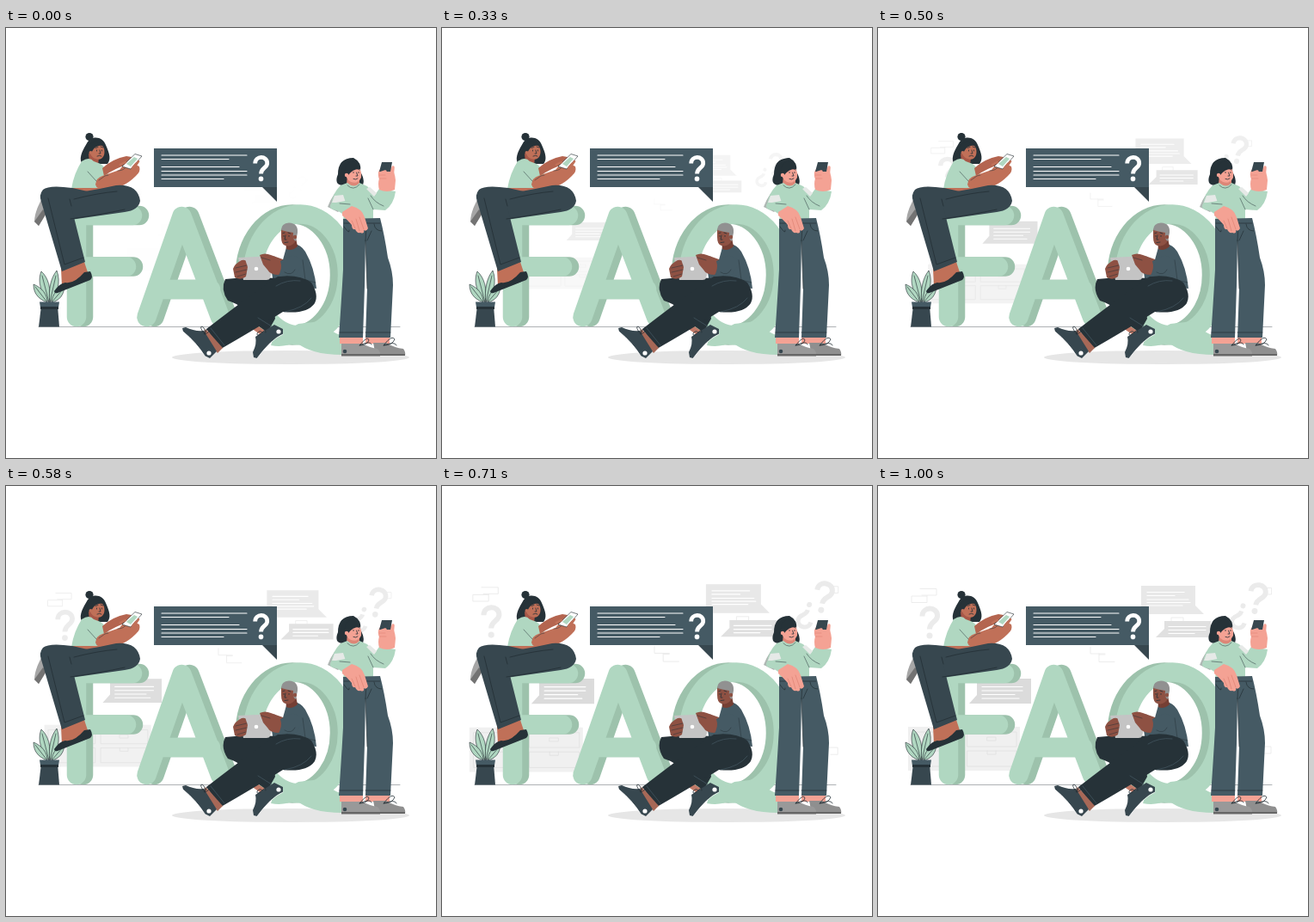
Recreate the animation shown at these times as an HTML page. Size 500 by 500 pixels, loop 1.04 s.

```html
<!DOCTYPE html>
<html lang="en">
<head>
<meta charset="utf-8">
<title>FAQ</title>
<style>
html, body { margin: 0; width: 100%; height: 100%; overflow: hidden; background: #fff }
svg { display: block; width: 100vw; height: 100vh }
.line { fill: none; stroke-linecap: round; stroke-linejoin: round }
.ink { stroke: #263238; stroke-width: .8 }
.seam { stroke: #1d282d; stroke-width: .6 }
.white { stroke: #fff; stroke-width: 1.2 }
.brick { stroke: #ebebeb; stroke-width: .9 }
</style>
</head>
<body>
<svg viewBox="0 0 500 500">
<defs>
  <g id="ask">
    <path class="line" style="stroke-linecap:butt" stroke="currentColor" stroke-width="5.6" d="M-8-7C-8-18 8.500-18 8.500-7.500C8.500-1 0-1 0 7"/>
    <circle cy="14" r="3.300" fill="currentColor"/>
  </g>
  <path id="F" d="M82 218H147M82 277.500H140M82 218V336"/>
  <path id="A" d="M163.500 336L204.500 219L249 336M176 304H238"/>
  <ellipse id="Q" cx="342" cy="287" rx="55" ry="70.500"/>
</defs>

<!-- zooming background -->
<g id="back">
  <path class="line brick" d="M49 119.500H68V127H51M57 127.500V135.500H39V128H57M247 187V195H264M264 196H257V204.500H275M257 196V195M341 158V153H355V158M449 118.500H457.500V126H448M447 303H457V311H449"/>
  <g color="#ebebeb">
    <use href="#ask" transform="translate(60 159) scale(1.07)"/>
    <use href="#ask" transform="translate(440.500 131) rotate(10) scale(1.05)"/>
    <use href="#ask" transform="translate(421 151.500) rotate(196) scale(.9)"/>
  </g>
  <path fill="#f0f0f0" d="M35 280H165V331H35Z"/>
  <path class="line" stroke="#e0e0e0" stroke-width=".8" d="M40 286H97V303H40ZM40 308H97V326H40ZM104 286H161V303H104ZM104 308H161V326H104ZM127 292H137V296H127ZM127 308V312H137V308"/>
  <path fill="#dbdbdb" d="M115 224H178V253H106L115 243Z"/>
  <path class="line white" d="M121 233.500H168M121 238H168M121 242.500H159M121 247H164"/>
  <path fill="#e8e8e8" d="M306 116H369V139L379 149H306Z"/>
  <path class="line white" d="M313 123.500H356M313 127.500H345M313 132H361M313 135.500H363M313 139H354"/>
  <path fill="#e0e0e0" d="M333 157H387V176H323L333 166Z"/>
  <path class="line white" d="M338 163.500H381M338 167.500H381M338 171.500H368"/>
</g>

<path class="line" stroke="#263238" stroke-width=".5" stroke-opacity=".75" d="M38 347.500H458"/>
<ellipse cx="331" cy="383" rx="138" ry="8" fill="#e6e6e6"/>

<!-- letters -->
<g class="line" stroke-width="22.500">
  <g stroke="#9dc2ac">
    <use href="#F" x="8"/><use href="#A" x="9"/><use href="#Q" x="-9"/>
  </g>
  <g stroke="#b0d7c1">
    <use href="#F"/><use href="#A"/><use href="#Q"/>
  </g>
</g>
<path fill="#b0d7c1" d="M308 369Q324 372 337 365Q354 380 391 380V358Q376 353 366 341L340 344Q326 352 312 356Z"/>

<!-- question bubble -->
<path fill="#455a64" d="M172 140H315V185H172Z"/>
<path fill="#37474f" d="M298 185H315V202Z"/>
<path class="line white" style="stroke-width:1.100" d="M181 148H280M181 152.500H259M181 161.500H271M181 166.500H280M181 171H280M181 175.500H253"/>
<use href="#ask" color="#fff" transform="translate(296.500 163.500) scale(.85)"/>

<!-- plant -->
<g fill="#b0d7c1" class="seam">
  <path d="M50 319C39 306 37 293 41 283C49 290 53 303 50 319Z"/>
  <path d="M51 319C49 304 52 291 59 282C64 295 60 310 51 319Z"/>
  <path d="M48 319C37 315 32 308 32 298C42 302 48 310 48 319Z"/>
  <path d="M53 319C54 309 60 303 68 301C67 311 62 317 53 319Z"/>
  <path class="line" d="M50 319L42 288M51 319L58 288M48 319L34 301M53 319L66 304"/>
</g>
<path fill="#37474f" d="M41 323H60L62 347.500H38Z"/>
<path fill="#455a64" d="M39 318.500H62L61 325H40Z"/>
<path fill="#263238" d="M40 324H61V327H40Z"/>

<!-- sitting woman -->
<path fill="#a6a6a6" d="M48 188Q33 211 33 225L38 230L50 211Z"/>
<path fill="#737373" d="M33 225L38 230L47 215L43 211Z"/>
<g fill="#263238">
  <circle cx="97" cy="126.500" r="4.600"/>
  <path d="M88 157C84 150 91 139 94 134C99 124 113 126 116 136C121 147 122 153 118 158H106Z"/>
</g>
<path fill="#a85848" d="M96 146L108 150L107 161L97 157Z"/>
<path fill="#c07058" d="M97 139C103 133 112 134 114 140C116 148 112 154 106 152.500C100 152 97 147 97 139Z"/>
<path fill="#263238" d="M94 145C93 134 104 128 114 137C107 136 102 138 99 146Z"/>
<circle cx="98.500" cy="145" r="2" fill="#c07058"/>
<path class="line ink" d="M104 139.500L107 138.500M110 138L113 139M105.500 142V143M111.500 142V143M109 142L110 146H108M106 149Q109 147.500 111 149"/>
<path fill="#b0d7c1" d="M88 155Q97 149 102 155L110 158Q116 162 119 171L108 178L110 187H76Q79 169 88 155Z"/>
<path fill="#c07058" d="M76 186H111L113 192H75Z"/>
<path fill="#b46550" d="M112 163Q124 152 140 149L146 150L143 158Q127 163 114 172Z"/>
<path fill="#c07058" d="M104 182Q105 174 112 172L132 165Q140 154 149 158L155 161Q157 167 151 172Q136 187 117 188Q105 188 104 182Z"/>
<path class="line ink" style="stroke-width:.5" d="M108 177L115 172L119 171M95 167L105 178M135 160L140 156M130 166Q137 166 140 161"/>
<path fill="#fff" class="seam" d="M135 161L150 146.500L158 149L145 164Z"/>
<path fill="#b0d7c1" d="M140 158L149 150L153 152L145 161Z"/>
<path class="line" stroke="#c07058" stroke-width="2.600" d="M150 161L154 155M147 163L151 158M133 159L139 156"/>
<path fill="#c07058" d="M64 280L91 272L95 284L85 291Q74 302 65 300Z"/>
<path fill="#263238" d="M56 306Q62 297 69 296Q79 298 91 284L98 283Q102 290 98 293L60 308Q56 309 56 306Z"/>
<path fill="#37474f" d="M60 194Q92 191 128 183Q153 181 156 201Q154 212 138 214L75 223Z"/>
<path fill="#37474f" d="M77 186Q50 182 43 188Q38 194 41 202L65 283L92 272L76 208Q79 195 104 192Z"/>
<path class="line seam" d="M76 207L74 199M79 199Q106 192 129 190M49 198L68 275L90 267M75 222Q110 217 138 211"/>

<!-- reading man -->
<path fill="#455a64" d="M326 255Q339 246 348 260Q359 279 361 303L311 297L309 284L321 273Z"/>
<path fill="#753f34" d="M325 248L337 244L339 254Q332 260 326 257Z"/>
<path fill="#8e5143" d="M320 234Q326 229 334 235L337 247Q333 255 325 253Q320 252 320 243Z"/>
<path fill="#919191" d="M320 235Q320 227 329 226.500Q340 227 339 238L337 248Q333 246 334 238Q327 237 320 235Z"/>
<circle cx="336" cy="243" r="2.200" fill="#8e5143"/>
<path class="line ink" d="M322 238.500L324 238M328 238L331 239M323 241.500V242.500M329 241.500V242.500M325 241L324 246H326M324 249.500L328 249"/>
<path fill="#263238" d="M255 292Q249 304 258 317Q278 323 286 341L304 354L313 338Q308 316 323 291L278 290Z"/>
<path fill="#c07a68" d="M286 342L304 354L301 360L285 349Z"/>
<path fill="#263238" d="M316 289Q341 286 355 296Q364 310 359 320Q350 333 322 330Q290 350 250 373L233 350Q290 306 316 289Z"/>
<path fill="#a76857" d="M236 354L232 350L229 355L246 378L252 372Z"/>
<path class="line" stroke="#455a64" stroke-width=".7" d="M238 349L254 369M293 337L309 347M314 300Q327 292 342 294M324 330Q346 326 355 314"/>
<path fill="#37474f" d="M205 349L209 348Q219 353 230 352L245 376L237 384L231 381Q222 366 206 353Z"/>
<path fill="#37474f" d="M288 383L287 377Q292 367 290 359L312 345L322 350L322 356Q309 361 292 384Z"/>
<g fill="#fff"><circle cx="236" cy="378" r="2.600"/><circle cx="317" cy="353" r="2.600"/></g>
<path class="line ink" d="M231 356Q224 347 228 347Q232 349 231 356Q234 347 237 350Q237 354 231 356M298 354Q291 360 292 355Q295 351 298 354Q302 349 302 354"/>
<path class="line" stroke="#fff" stroke-width=".7" d="M206 353Q221 366 231 381M292 384Q308 362 322 356"/>
<path fill="#c4c4c4" d="M270 267L312 265Q314 266 313 269L307 291Q306 293 303 293H276Z"/>
<circle cx="291" cy="280" r="2.300" fill="#fff"/>
<path fill="#8e5143" d="M264 280Q266 274 274 270Q279 269 279 272L281 278L279 289Q273 294 266 290Z"/>
<path fill="#8e5143" d="M295 264Q301 261 308 264L322 269Q326 278 318 287Q307 287 304 281L299 275Z"/>
<path fill="#455a64" d="M319 271L334 264L347 271L337 287L316 289Q322 280 319 271Z"/>
<path class="line ink" style="stroke-width:.5" d="M267 279L280 276M267 284L280 281M269 289L279 286M297 267L307 270M345 270L348 293M324 284Q332 289 336 281M348 293L360 296"/>

<!-- standing woman -->
<path fill="#263238" d="M391 183Q381 182 386 170Q386 151 404 151Q414 156 412 167Q419 179 413 185Z"/>
<path fill="#dd8677" d="M397 171L411 176V185Q402 189 396 182Z"/>
<path fill="#f4a294" d="M395 163Q401 156 409 160Q414 166 413 174Q409 182 401 179Q394 176 395 163Z"/>
<path fill="#263238" d="M394 169Q393 156 404 155Q412 156 412 164Q404 163 398 171Z"/>
<circle cx="396" cy="171" r="2.200" fill="#f4a294"/>
<path class="line ink" d="M402 165L405 164M409 164L411 165M404 167.500V168.500M410 167.500V168.500M407.500 168L409 172H407M404 175.500Q407 177 409 175"/>
<path fill="#aeb7b3" d="M374 208Q381 190 391 184L395 206L386 214Z"/>
<path fill="#b0d7c1" d="M389 183L397 180Q405 187 411 180L420 184L429 194L434 187L453 190Q451 205 441 212L427 211V223H392Q395 211 389 205L378 205Q380 192 389 183Z"/>
<path fill="#e6e9e7" d="M382 195L392 194L395 203L379 203ZM419 187L423 185L431 192L428 196Z"/>
<path fill="#f4a294" d="M434 188Q432 181 434 175Q431 169 435 164L447 162Q452 166 453 177L452 188Q443 192 434 188Z"/>
<path fill="#37474f" d="M437 156H449L447 167H434Z"/>
<path class="line" stroke="#f4a294" stroke-width="3.500" d="M435 169L441 167M435 173L442 171M450 162L449 174"/>
<path class="line" stroke="#d87c6d" stroke-width=".5" d="M434 171H441M434 175H442"/>

<path fill="#f4a294" d="M388 357H415V367H388ZM418 357H446V367H418Z"/>
<path fill="#8f8f8f" d="M430 381L427 366H442Q452 372 462 373Q465 377 464 381Z"/>
<path fill="#999" d="M390 381V367H414Q424 372 432 373Q436 377 435 381Z"/>
<path fill="#666" d="M390 379H435V381.500H390ZM435 379H464V381H435Z"/>
<circle cx="394" cy="376" r="2.300" fill="#37474f"/>
<path class="line ink" d="M411 369Q421 357 422 363Q420 369 411 369Q424 363 425 368M439 369Q449 356 452 362Q449 369 439 369Q453 364 454 369"/>
<path fill="#455a64" d="M392 222L435 221Q440 240 444 267Q450 283 450 299L447 360H418L420 303L418 247L417 300L415 360H387Q390 317 392 281Z"/>
<path class="line seam" d="M418 247L419 229M393 227H435M393 231Q400 241 399 235M428 228Q429 236 437 236M388 354H415M418 354H447M425 236L420 247M418 247L420 303"/>
<path fill="#b0d7c1" d="M378 204Q374 211 385 212L394 218L403 207L395 201Z"/>
<path fill="#f4a294" d="M391 214L402 207Q414 210 417 220L421 233Q419 237 416 235Q417 240 412 238Q408 239 406 234Q402 235 402 229Q396 222 391 218Z"/>
<path class="line" stroke="#d87c6d" stroke-width=".6" d="M407 222L411 236M411 220L416 234M402 224L406 233"/>
<path class="line ink" style="stroke-width:.5" d="M424 195Q429 203 439 207M400 205L388 204M397 183Q404 190 411 182M421 198L427 211"/>
</svg>
<script>
const back = document.getElementById('back');
const loop = 1040, steps = 25, cx = 246.5, cy = 231.5;

const bezier = (a, b, u) => 3 * (1 - u) ** 2 * u * a + 3 * (1 - u) * u * u * b + u ** 3;

// cubic-bezier(.36, -.01, .5, 1.38): overshoots before it settles
function ease(t) {
  let lo = 0, hi = 1;
  for (let i = 0; i < 30; i++) {
    const mid = (lo + hi) / 2;
    if (bezier(.36, .5, mid) < t) lo = mid; else hi = mid;
  }
  return bezier(-.01, 1.38, hi);
}

function draw(now) {
  const step = Math.floor(now % loop / loop * steps + .1) % steps;
  const e = ease((step + 1) / steps);
  back.setAttribute('transform', `translate(${cx} ${cy}) scale(${.5 + e / 2}) translate(${-cx} ${-cy})`);
  back.setAttribute('opacity', Math.min(1, Math.max(0, e)));
}

const start = performance.now();
function tick() {
  draw(performance.now() - start);
  requestAnimationFrame(tick);
}
tick();
</script>
</body>
</html>
```
